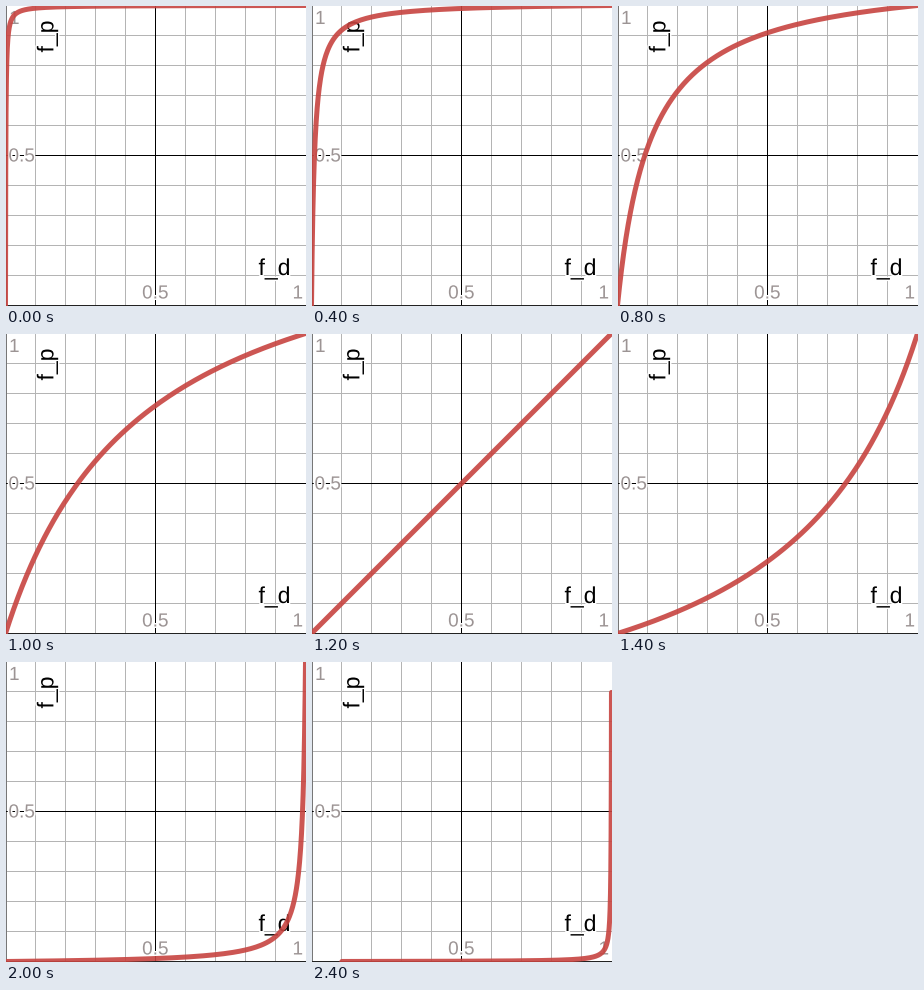
Write a matplotlib script that moves like this. It is 300x300 px and loops after 2.5 s.

```python
import numpy as np
import matplotlib.pyplot as plt
from matplotlib.animation import FuncAnimation
from matplotlib.patheffects import withStroke

SIZE, DPI = 300, 100
PX = 72 / DPI
FRAMES, INTERVAL = 25, 100
GRID, GRAY = "#b4b4b4", "#9c9494"

plt.rcParams["font.family"] = "Liberation Sans"
fig = plt.figure(figsize=(SIZE / DPI, SIZE / DPI), dpi=DPI, facecolor="white")
ax = fig.add_axes([0, 0, 1, 1])
ax.set_xlim(0, SIZE)
ax.set_ylim(SIZE, 0)
ax.axis("off")


def rule(pos, color, vertical, z=1):
    draw = ax.axvline if vertical else ax.axhline
    draw(pos, color=color, lw=PX, zorder=z, snap=False)


def label(x, y, text, size, color, **kw):
    halo = [withStroke(linewidth=3 * PX, foreground="white")]
    ax.text(x, y, text, fontsize=size * PX, color=color, zorder=3,
            path_effects=halo, **kw)


for k in range(1, 10):
    for vertical in (True, False):
        major = k == 5
        rule(30 * k - 0.5, "black" if major else GRID, vertical,
             2 if major else 1)
rule(0.5, "#777777", True)
rule(299.5, "#222222", False, 2)

label(2.5, 155.5, "0.5", 19, GRAY)
label(149.3, 292.5, "0.5", 19, GRAY, ha="center")
label(3, 18, "1", 19, GRAY)
label(286.5, 292.5, "1", 19, GRAY)
label(252.5, 269, "f_d", 23, "black")
label(47.4, 46.5, "f_p", 23, "black", rotation=90, rotation_mode="anchor")

curve, = ax.plot([], [], color="#c74440", alpha=0.9, lw=5 * PX, zorder=4,
                 solid_capstyle="round", solid_joinstyle="round")

# Logistic parameter: s is the log-odds of x
s = np.linspace(-16, 16, 800)


def logistic(v):
    return 1 / (1 + np.exp(-v))


def update(i):
    power = 3 - i / 4
    x = logistic(s)
    y = logistic(s + power * np.log(10))
    if power <= -3:
        keep = (x >= 0.1) & (y <= 0.9)
        x, y = x[keep], y[keep]
    curve.set_data(SIZE * x - 0.5, SIZE * (1 - y) - 0.5)
    return curve,


anim = FuncAnimation(fig, update, frames=FRAMES, interval=INTERVAL,
                     repeat=True, repeat_delay=0, blit=False)
plt.show()
```
